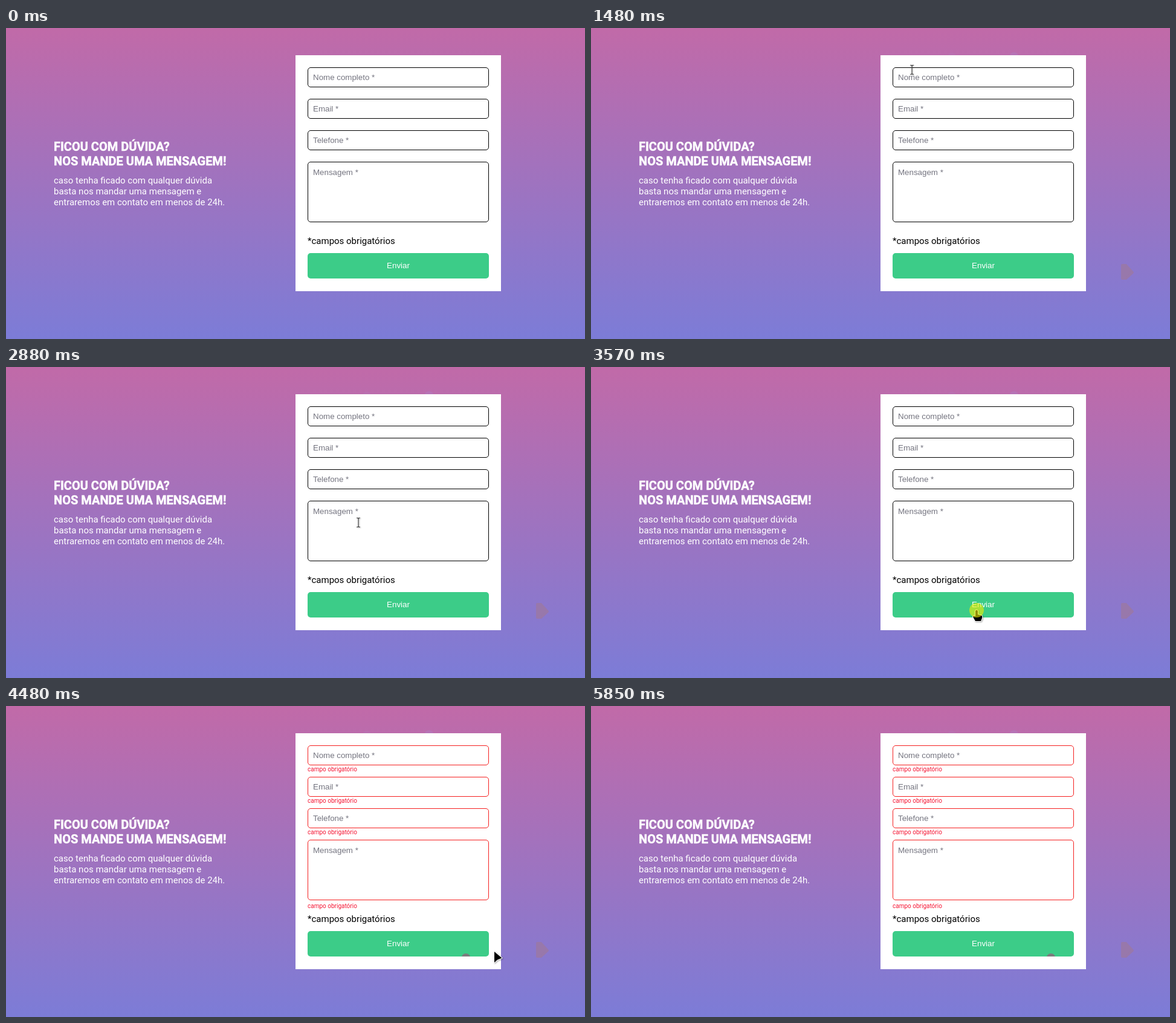
An HTML page that plays this animation: 958 by 514 pixels, repeating every 6250 ms.

```html
<!DOCTYPE html>
<html lang="pt-BR">
<head>
<meta charset="utf-8">
<title>Contato</title>
<style>
html, body { margin: 0; width: 100%; height: 100%; overflow: hidden; }
svg { display: block; width: 958px; height: 514px; background: linear-gradient(#c16aa8, #7c7cd7); font: 15px Roboto, sans-serif; }
.title { font-weight: 700; font-size: 20px; stroke: #fff; stroke-width: .5px; }
.arial { font: 13.333px "Liberation Sans", Arial, sans-serif; }
.field { fill: #fff; stroke: #000; }
.error { font-size: 10px; fill: #f51432; visibility: hidden; }
.invalid .field { stroke: #f52020; }
.invalid .error { visibility: visible; }
</style>
</head>
<body>
<svg viewBox="0 0 958 514">
  <defs><path id="dome" d="M-7 5Q-5 0 0 0T7 5Z"/></defs>
  <g fill="#fff">
    <text class="title" x="79" y="203">FICOU COM DÚVIDA?</text>
    <text class="title" x="79" y="227">NOS MANDE UMA MENSAGEM!</text>
    <text x="79" y="257">caso tenha ficado com qualquer dúvida</text>
    <text x="79" y="275">basta nos mandar uma mensagem e</text>
    <text x="79" y="293">entraremos em contato em menos de 24h.</text>
  </g>
  <!-- faint marks the pointer leaves behind -->
  <path data-from="140" fill="#9878ab" stroke="#9878ab" stroke-width="4" stroke-linejoin="round" d="M879 392V414H885L896 404 885 392Z"/>
  <use data-from="540" href="#dome" x="700" y="40" fill="#b673b6"/>
  <use data-from="1220" href="#dome" x="597" y="41" fill="#b96fb0"/>
  <rect x="479" y="45" width="340" height="390" fill="#fff"/>
  <g id="form"></g>
  <text x="499" y="357">*campos obrigatórios</text>
  <rect x="499" y="372" width="300" height="42" rx="5" fill="#3ccc88"/>
  <text class="arial" x="649" y="397" text-anchor="middle" fill="#fff">Enviar</text>
  <use data-from="4420" href="#dome" x="761" y="409" fill="#7b7c7d"/>
  <g id="pointer" stroke-linejoin="round" filter="drop-shadow(1px 1px 1px #0005)">
    <path id="arrow" d="M1 1V19L6 14.500 13.500 11.500Z" stroke="#fff" stroke-width="2" paint-order="stroke"/>
    <path id="beam" d="M-3 -7.500H-1L0 -6.500 1 -7.500H3M0 -6.500V6.500M-3 7.500H-1L0 6.500 1 7.500H3" fill="none" stroke="#444" stroke-width="1.200"/>
    <path id="hand" d="M-2 1Q0 -2 2 1V7L8 8.500Q10 10 9 13L7 18H-2L-6 11Q-6 8 -2 10Z" stroke="#fff" stroke-width="2" paint-order="stroke"/>
  </g>
  <circle id="click" cx="638" cy="402" r="12" fill="#f2ee00" opacity=".6"/>
</svg>
<script>
const $ = id => document.getElementById(id);
const LOOP = 6250, CLICK = 3570, INVALID = 3710, EXIT = 5850;

const fields = ["Nome completo", "Email", "Telefone", "Mensagem"].map((label, i) => {
  const area = label == "Mensagem";
  return { label, area, top: 65 + 52 * i, height: area ? 100 : 33 };
});
const button = { top: 372, height: 42 };

$("form").innerHTML = fields.map(({ label, area, top, height }) => `
  <rect class="field" x="499.5" y="${top + .5}" width="299" height="${height - 1}" rx="4.5"/>
  <text class="arial" x="508" y="${top + 21 + area}" fill="#757580">${label} *</text>
  <text class="error" x="499" y="${top + height + (area ? 13 : 10)}">campo obrigatório</text>`).join("");

// Pointer strokes, each a smooth curve through evenly timed points
const strokes = [
  { start: 70, end: 1700, points: [[879, 391], [745, 20], [683, 52], [646, 53], [585, 41], [541, 64], [492, 87]] },
  { start: 1970, end: 3370, points: [[494, 86], [516, 90], [546, 149], [575, 235], [609, 322], [638, 402]] },
  { start: INVALID, end: 4060, points: [[638, 402], [673, 417]] },
  { start: 4270, end: EXIT, points: [[692, 419], [858, 390], [889, 306], [908, 328], [914, 436], [900, 516]] }
];

// Catmull-Rom curve through the points
function along(points, u) {
  const last = points.length - 1, s = u * last;
  const i = Math.min(Math.floor(s), last - 1), f = s - i;
  const at = k => points[Math.max(0, Math.min(last, k))];
  return [0, 1].map(axis => {
    const [a, b, c, d] = [-1, 0, 1, 2].map(k => at(i + k)[axis]);
    return b + f / 2 * (c - a + f * (2 * a - 5 * b + 4 * c - d + f * (3 * (b - c) + d - a)));
  });
}

const show = (el, on) => el.setAttribute("visibility", on ? "visible" : "hidden");
const inside = (x, y, { top, height }) => x >= 499 && x < 799 && y >= top && y < top + height;
const marks = [...document.querySelectorAll("[data-from]")];

function draw(t) {
  const stroke = strokes.findLast(s => t >= s.start);
  let kind = "";
  if (stroke && t < EXIT) {
    const { start, end, points } = stroke;
    const [x, y] = along(points, Math.min(1, (t - start) / (end - start)));
    kind = inside(x, y, button) ? "hand" : fields.some(f => inside(x, y, f)) ? "beam" : "arrow";
    $("pointer").setAttribute("transform", `translate(${Math.round(x)} ${Math.round(y)})`);
  }
  for (const id of ["arrow", "beam", "hand"]) show($(id), id == kind);
  for (const mark of marks) show(mark, t >= mark.dataset.from);
  show($("click"), t >= CLICK && t < CLICK + 210);
  $("form").classList.toggle("invalid", t >= INVALID);
}

const began = performance.now();
function tick() {
  draw((performance.now() - began) % LOOP);
  requestAnimationFrame(tick);
}
tick();
</script>
</body>
</html>
```
